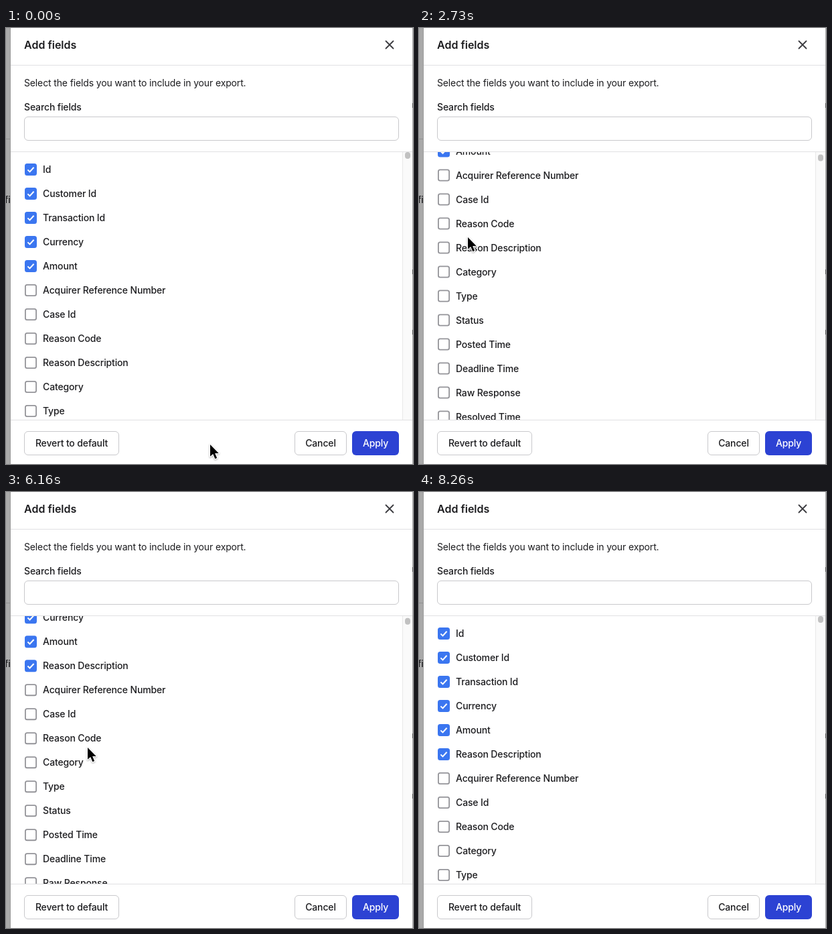
Animation of 608 by 650 pixels, one loop 9660 ms. Source, as an HTML page:

```html
<!DOCTYPE html>
<html lang="en">
<head>
<meta charset="utf-8">
<title>Add fields</title>
<style>
  html, body { margin: 0; width: 100%; height: 100%; overflow: hidden; background: #fff; }
  svg { display: block; }
  text { font: 500 14px Inter, sans-serif; letter-spacing: -0.01em; fill: #1c1c1f; }
  .title { font-size: 16px; font-weight: 600; letter-spacing: 0; }
  .intro { font-weight: 400; }
  .centered { text-anchor: middle; }
  .line { fill: #e1e1e3; }
  .field { fill: #fff; stroke: #c9c9cc; }
  .box { fill: #fff; stroke: #949499; stroke-width: 1.8; }
  .tick { fill: none; stroke: none; stroke-width: 2; }
  .checked .box { fill: #3b76f0; stroke: #3b76f0; }
  .checked .tick { stroke: #fff; }
  .halo { paint-order: stroke; stroke: #fff; stroke-width: 2.4; stroke-linejoin: round; }
  #cursor { filter: drop-shadow(0 1px 1px rgba(0, 0, 0, .3)); }
</style>
</head>
<body>
<svg width="608" height="650" viewBox="0 0 608 650">
  <defs>
    <clipPath id="listClip"><rect x="7" y="185" width="585" height="399"/></clipPath>
    <clipPath id="pageClip"><rect width="7" height="650"/></clipPath>
  </defs>

  <!-- dimmed page behind the dialog -->
  <rect width="608" height="650" fill="#a9a9a9"/>
  <rect y="165" width="7" height="1" fill="#919191"/>
  <g clip-path="url(#pageClip)"><text x="-2" y="261">fi</text></g>
  <rect x="6" width="1" height="650" fill="#9d9d9d"/>
  <g fill="#555">
    <rect x="607" y="112" width="1" height="7"/>
    <rect x="607" y="360" width="1" height="7"/>
    <rect x="607" y="450" width="1" height="7"/>
  </g>

  <rect x="7" width="600" height="650" fill="#fff"/>
  <text class="title" x="27" y="31">Add fields</text>
  <path d="M567.5 19.5l11 11m0-11l-11 11" stroke="#3c3c40" stroke-width="1.8" stroke-linecap="round"/>
  <rect class="line" x="7" y="55" width="600" height="1"/>
  <text class="intro" x="27" y="87">Select the fields you want to include in your export.</text>
  <text x="27" y="123">Search fields</text>
  <rect class="field" x="27.5" y="132.5" width="559" height="35" rx="5.5"/>
  <rect class="line" x="7" y="184" width="600" height="1"/>

  <g clip-path="url(#listClip)"><g id="list"></g></g>
  <rect x="592" y="185" width="15" height="399" fill="#fafafa"/>
  <rect x="592" y="185" width="1" height="399" fill="#e8e8e8"/>
  <rect id="thumb" x="596" width="8" height="10" rx="4" fill="#c1c1c1"/>

  <rect class="line" x="7" y="584" width="600" height="1"/>
  <rect class="field" x="27.5" y="601.5" width="141" height="35" rx="5.5"/>
  <text class="centered" x="98" y="624">Revert to default</text>
  <rect class="field" x="431.5" y="601.5" width="77" height="35" rx="5.5"/>
  <text class="centered" x="470" y="624">Cancel</text>
  <rect x="517" y="601" width="70" height="36" rx="6" fill="#2c42d3"/>
  <text class="centered" x="552" y="624" style="fill:#fff">Apply</text>

  <circle id="ring" fill="none" stroke="#000" stroke-opacity=".25" stroke-width="2"/>
  <g id="cursor">
    <path id="arrow" class="halo" transform="scale(1.08)"
      d="M0 0V16.5L3.9 12.9 6.8 19.6 9.4 18.5 6.6 12H11.8Z"/>
    <g id="hand" transform="translate(-4.5 -1)">
      <path fill="#fff" stroke="#000" stroke-width="1.5" stroke-linejoin="round"
        d="M4.6 1.4C6.2.6 7.5 1.4 8.1 3L10.2 8.8C11 8 12.6 8 13.2 9.2 14.2 8.4 15.8 8.8 16.2 10
           17.4 9.4 19 10 19.3 11.6 19.8 14.4 19.6 16.6 18.4 19L17.8 22.8H9.6L8.8 20.8
           C6.6 19 4.4 16.4 2 14 .6 12.4 1.2 10.6 3 10.6 4.4 10.6 5.6 11.6 6.8 12.6
           L3.4 4.2C3 2.8 3.4 1.8 4.6 1.4Z"/>
      <path stroke="#000" stroke-width="1.2" d="M10.8 14.5v5M13.4 14.5v5M16 14.5v5"/>
    </g>
  </g>
</svg>
<script>
const LOOP = 9660, STEP = 70, ROW = 36, FIRST_ROW = 211;
const PICKED = 8, PICKED_SLOT = 5, PICK_TIME = 4620, EXIT_TIME = 8260;
const labels = ['Id', 'Customer Id', 'Transaction Id', 'Currency', 'Amount',
  'Acquirer Reference Number', 'Case Id', 'Reason Code', 'Reason Description', 'Category',
  'Type', 'Status', 'Posted Time', 'Deadline Time', 'Raw Response', 'Resolved Time'];

// start, end, from, to, ease-out power
const scrolls = [
  [420, 1120, 0, 100, 2],
  [1330, 1680, 100, 154, 4],
  [2170, 2660, 154, 171.5, 2],
  [5950, 6790, 171.5, 113.5, 4],
  [6930, 7280, 113.5, 0, 1]
];
// time, x, y of the pointer tip
const path = [
  [0, 305, 621], [210, 235, 478], [420, 235, 478], [1120, 212, 454], [1750, 212, 454],
  [2100, 148, 390], [2170, 148, 390], [2730, 73, 312], [3010, 39, 330], [3780, 39, 330],
  [3990, 39, 340], [4060, 39, 340], [4270, 41, 331.5], [5250, 41, 331.5], [5810, 122, 381],
  [6930, 122, 381], [7140, 112, 382], [7350, 112, 382], [7630, 103, 324], [7700, 103, 324],
  [7910, 97, 373], [8050, 97, 373], [8190, 456, 573]
];
const handTimes = [[2870, 5390], [7140, 7420], [7560, 7770]];
// start, end, x, y, radius
const clicks = [[3360, 3500, 38.5, 326.5, 31], [4480, 4620, 41, 327.5, 43]];

const $ = id => document.getElementById(id);
const show = (el, on) => el.setAttribute('visibility', on ? 'visible' : 'hidden');
const during = t => ([start, end]) => t >= start && t < end;

$('list').innerHTML = labels.map(label => `<g>
  <rect class="box" x="28.9" y="-8.1" width="16.2" height="16.2" rx="2.6"/>
  <path class="tick" d="M32.4 .4L35.5 3.4 41.6 -3.2"/>
  <text x="55" y="5">${label}</text></g>`).join('');
const rows = [...$('list').children];

function scrollAt(t) {
  const [start, end, from, to, power] = scrolls.filter(s => t >= s[0]).pop() || scrolls[0];
  const u = Math.min(1, Math.max(0, (t - start) / (end - start)));
  return from + (to - from) * (1 - (1 - u) ** power);
}

function pointerAt(t) {
  const next = path.findIndex(p => p[0] > t);
  if (next < 0) return path[path.length - 1].slice(1);
  const [t0, x0, y0] = path[next - 1], [t1, x1, y1] = path[next];
  const u = (t - t0) / (t1 - t0);
  return [x0 + (x1 - x0) * u, y0 + (y1 - y0) * u];
}

function slotOf(i, picked) {
  if (!picked || i < PICKED_SLOT || i > PICKED) return i;
  return i === PICKED ? PICKED_SLOT : i + 1;
}

function draw(now) {
  const t = Math.floor((now % LOOP) / STEP) * STEP;
  const scroll = scrollAt(t), picked = t >= PICK_TIME;

  rows.forEach((row, i) => {
    const slot = slotOf(i, picked);
    row.setAttribute('transform', `translate(0 ${FIRST_ROW + slot * ROW - scroll})`);
    row.classList.toggle('checked', slot < PICKED_SLOT + picked);
  });
  $('thumb').setAttribute('y', 185 + scroll * 0.02);

  const visible = t < EXIT_TIME, hand = handTimes.some(during(t));
  $('cursor').setAttribute('transform', `translate(${pointerAt(t)})`);
  show($('arrow'), visible && !hand);
  show($('hand'), visible && hand);

  const click = clicks.find(during(t));
  show($('ring'), click);
  if (click) ['cx', 'cy', 'r'].forEach((name, i) => $('ring').setAttribute(name, click[i + 2]));
}

const begin = performance.now();
(function tick() {
  draw(performance.now() - begin);
  requestAnimationFrame(tick);
})();
</script>
</body>
</html>
```
